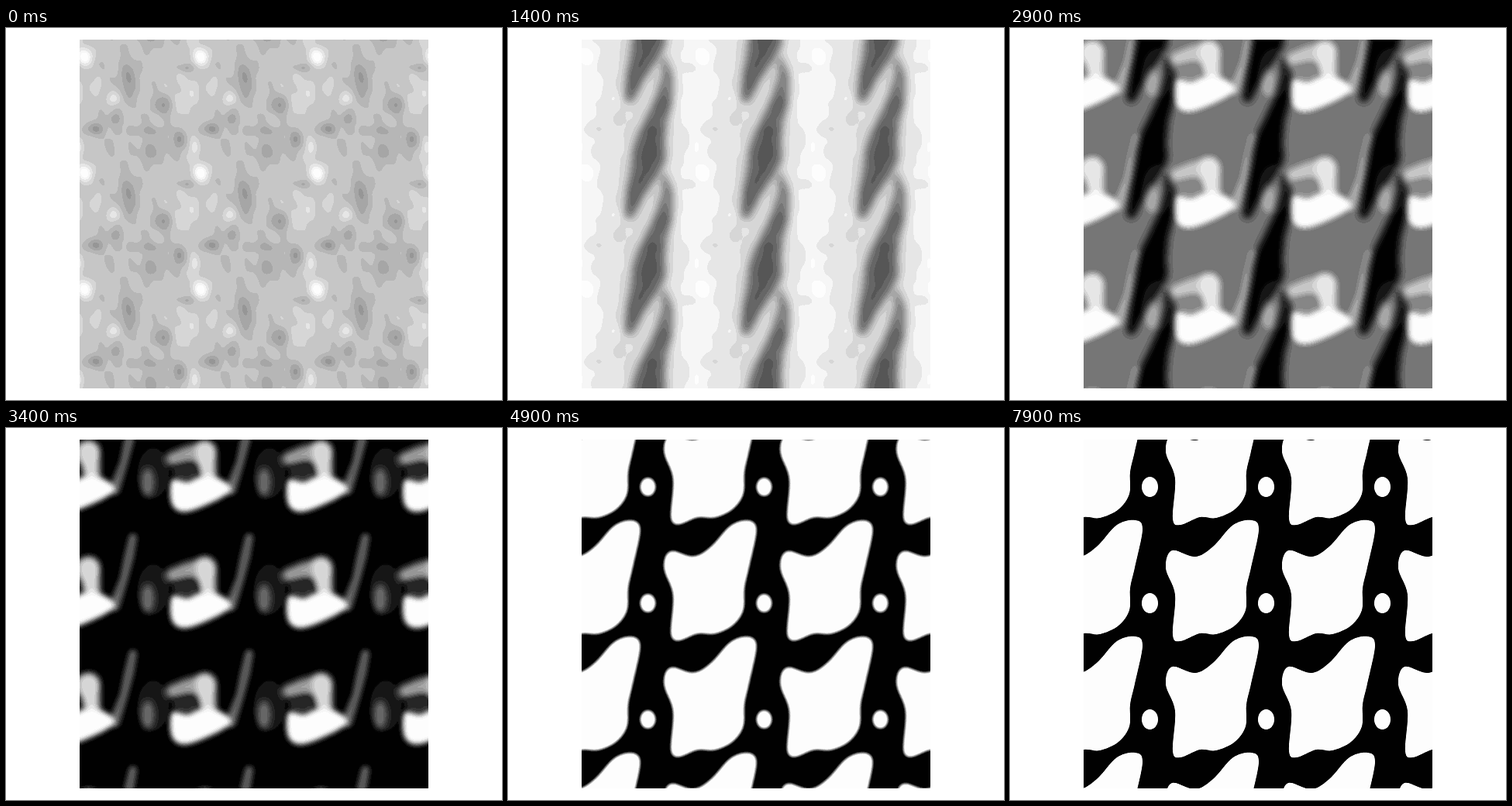
These frames come from a looping animation (640 px wide and 480 px high, 8 s). An HTML page with a canvas:

```html
<!DOCTYPE html>
<html lang="en">
<head>
<meta charset="utf-8">
<title>Periodic cell</title>
<style>
html, body { margin: 0; width: 100%; height: 100%; overflow: hidden; background: #fff; }
canvas { display: block; width: 640px; height: 480px; }
</style>
</head>
<body>
<canvas id="stage" width="640" height="480"></canvas>
<script>
const LOOP = 8000, STEP = 100, SIZE = 150, LEFT = 95, TOP = 15, SETTLE = 4900;
const stage = document.getElementById('stage').getContext('2d');
const tileCanvas = document.createElement('canvas');
tileCanvas.width = tileCanvas.height = SIZE;
const tile = tileCanvas.getContext('2d', { willReadFrequently: true });

const mix = (a, b, u) => a + (b - a) * u;
const wrap = d => d - SIZE * Math.round(d / SIZE);

function seededRandom(seed) {
  return () => (seed = seed * 16807 % 2147483647) / 2147483647;
}

// Closed smooth curve through a few points
function outline(points) {
  const path = new Path2D(), n = points.length;
  const at = i => points[(i + n) % n];
  path.moveTo(...at(0));
  for (let i = 0; i < n; i++) {
    const [a, b, c, d] = [at(i - 1), at(i), at(i + 1), at(i + 2)];
    path.bezierCurveTo(b[0] + (c[0] - a[0]) / 6, b[1] + (c[1] - a[1]) / 6,
      c[0] - (d[0] - b[0]) / 6, c[1] - (d[1] - b[1]) / 6, ...c);
  }
  path.closePath();
  return path;
}

// Brush stroke along a spine of x, y, radius
function sweep(spine) {
  const path = new Path2D();
  for (let i = 0; i < spine.length - 1; i++) {
    for (let u = 0; u <= 1; u += 0.05) {
      const [x, y, r] = spine[i].map((v, k) => mix(v, spine[i + 1][k], u));
      path.moveTo(x + r, y);
      path.arc(x, y, r, 0, 7);
    }
  }
  return path;
}

function oval(x, y, rx, ry) {
  const path = new Path2D();
  path.ellipse(x, y, rx, ry, 0, 0, 7);
  return path;
}

function clearTile(value, blend = 'source-over') {
  tile.globalCompositeOperation = 'source-over';
  tile.fillStyle = `rgb(${value},${value},${value})`;
  tile.fillRect(0, 0, SIZE, SIZE);
  tile.globalCompositeOperation = blend;
}

// Fills a shape in every neighbouring cell so that it wraps round the tile
function fillWrapped(path, value, blur) {
  tile.fillStyle = `rgb(${value},${value},${value})`;
  tile.filter = `blur(${blur}px)`;
  for (let i = -2; i <= 1; i++) {
    for (let j = -2; j <= 1; j++) {
      tile.setTransform(1, 0, 0, 1, i * SIZE - LEFT, j * SIZE - TOP);
      tile.fill(path);
    }
  }
  tile.resetTransform();
  tile.filter = 'none';
}

function makeField(valueAt) {
  return Float32Array.from({ length: SIZE * SIZE },
    (_, i) => valueAt(i % SIZE, Math.floor(i / SIZE), i));
}

function readTile() {
  const { data } = tile.getImageData(0, 0, SIZE, SIZE);
  return makeField((x, y, i) => data[i * 4]);
}

// Main peaks and pits (x, y, radii, strength) over seeded periodic ripples
function noiseField() {
  const blobs = [
    [6, 21, 13, 13, 58], [43, 76, 9, 9, 34], [148, 138, 7, 16, 34], [137, 72, 18, 28, 22],
    [20, 62, 14, 14, 16], [63, 51, 10, 23, -42], [107, 84, 12, 14, -40], [137, 36, 12, 6, -30],
    [20, 115, 15, 8, -34], [45, 102, 8, 8, -30], [88, 117, 18, 8, -26], [127, 127, 10, 12, -36],
    [90, 145, 9, 13, -30], [106, 140, 22, 18, -12]
  ];
  const random = seededRandom(11);
  const waves = Array.from({ length: 8 }, () =>
    [Math.round(random() * 14 - 7), Math.round(random() * 14 - 7), random() * 7]);
  return makeField((px, py) => {
    let sum = 197;
    for (const [x, y, rx, ry, power] of blobs) {
      sum += power * Math.exp(-((wrap(px - x) / rx) ** 2) - (wrap(py - y) / ry) ** 2);
    }
    for (const [kx, ky, phase] of waves) {
      sum += 2 * Math.cos((kx * px + ky * py) * 2 * Math.PI / SIZE + phase);
    }
    return sum;
  });
}

const strand = sweep([
  [201, 40, 3], [206, 62, 7], [202, 90, 10.5], [192, 118, 13], [183, 150, 19], [182, 165, 22],
  [178, 180, 19], [172, 195, 15], [165, 212, 11], [156, 241, 6]
]);

function strandField(blur) {
  clearTile(253);
  fillWrapped(strand, 10, blur);
  return readTile();
}

// Noise fading out while the strand and a light column emerge
function columnField(noise, crisp, soft) {
  return makeField((x, y, i) => 232 + 0.35 * (noise[i] - 198)
    + 9 * Math.cos((x - 148) * 2 * Math.PI / SIZE)
    - 0.27 * (253 - crisp[i]) - 0.27 * (253 - soft[i]));
}

function islandField() {
  clearTile(0, 'lighten');
  fillWrapped(oval(340, 208, 20, 32), 24, 2);
  fillWrapped(oval(333, 220, 8, 18), 115, 4);
  fillWrapped(sweep([[290, 229, 7], [302, 195, 5], [309, 165, 6], [314, 140, 5]]), 100, 3);
  fillWrapped(sweep([[214, 190, 8], [236, 183, 10], [257, 182, 13]]), 160, 4);
  fillWrapped(sweep([[257, 180, 13], [261, 212, 10]]), 220, 4);
  fillWrapped(sweep([[232, 205, 16], [234, 212, 16]]), 45, 4);
  fillWrapped(outline([
    [214, 218], [215, 250], [238, 257], [290, 231], [268, 212], [250, 213], [234, 220]
  ]), 255, 3);
  return readTile();
}

const cell = outline([
  [312, 119], [321, 131], [311, 180], [305, 207], [304, 235], [290, 255], [266, 266], [245, 265],
  [220, 275], [210, 267], [213, 215], [201, 181], [209, 158], [239, 166], [262, 153], [288, 125]
]);
const hole = oval(180.5, 76, 10.5, 13);

// Blur followed by contrast rounds the corners; both relax as the cell settles
function cellField(u) {
  const gain = mix(3.2, 1.2, u), blur = mix(4.6, 0.6, u);
  clearTile(0);
  fillWrapped(cell, 254, blur);
  fillWrapped(hole, 254, blur);
  return readTile().map(v => (v - 127) * gain + 127);
}

const noise = noiseField(), strands = strandField(4.5);
const keys = [
  [0, noise],
  [1400, columnField(noise, strands, strandField(9))],
  [2300, strands],
  [3400, islandField()],
  [SETTLE, cellField(0).map(v => Math.min(255, Math.max(0, v)))]
];

function fieldAt(time) {
  if (time >= SETTLE) return cellField(1 - Math.exp((SETTLE - time) / 480));
  const k = keys.findIndex(([end]) => time < end);
  const [start, from] = keys[k - 1], [end, to] = keys[k];
  let u = (time - start) / (end - start);
  if (end === SETTLE) u = 1 - (1 - u) ** 1.7;
  return from.map((v, i) => mix(v, to[i], u));
}

function band(v) {
  if (v < 8) return 1;
  if (v > 250) return 253;
  return Math.round((v - 6) / 16) * 16 + 6;
}

function render(time) {
  const image = tile.createImageData(SIZE, SIZE);
  fieldAt(time).forEach((v, i) => {
    image.data.fill(band(v), i * 4, i * 4 + 3);
    image.data[i * 4 + 3] = 255;
  });
  tile.putImageData(image, 0, 0);
  stage.fillStyle = '#fff';
  stage.fillRect(0, 0, 640, 480);
  for (let i = 0; i < 9; i++) {
    stage.drawImage(tileCanvas, LEFT + i % 3 * SIZE, TOP + Math.floor(i / 3) * SIZE);
  }
}

let shown = -1;
function tick() {
  const now = Math.floor(performance.now() % LOOP / STEP) * STEP;
  const time = now < 200 ? 0 : now;
  if (time !== shown) render(shown = time);
  requestAnimationFrame(tick);
}
tick();
</script>
</body>
</html>
```
